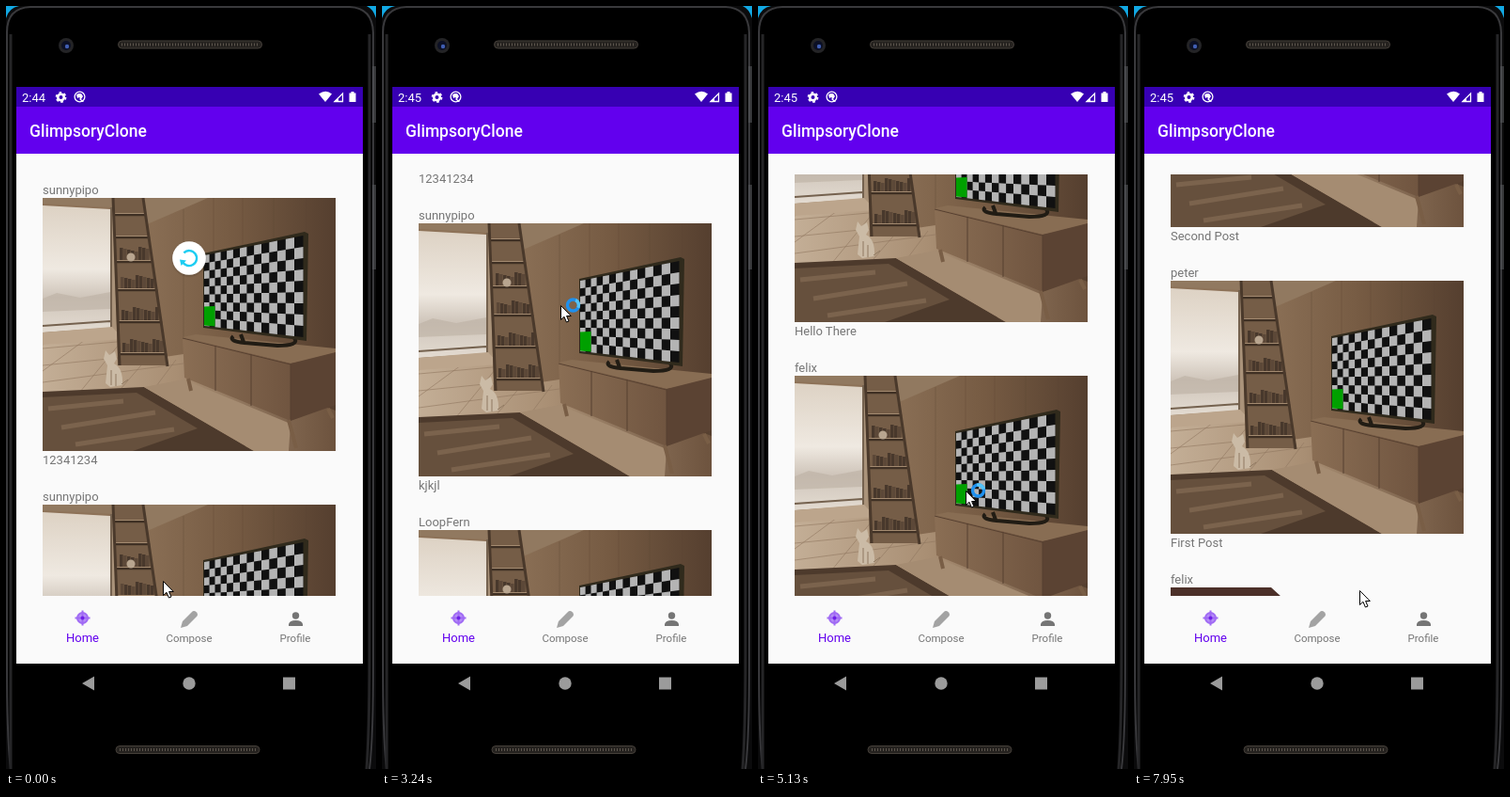
Animation, 394 px wide and 811 px high, one loop 8000 ms. Source, as an HTML page:

```html
<!DOCTYPE html>
<html lang="en">
<head>
<meta charset="utf-8">
<title>Photo feed</title>
<style>
html, body { margin: 0; width: 100%; height: 100%; overflow: hidden; background: #000; }
svg { display: block; font-family: Roboto, sans-serif; }
.post text { font-size: 13px; fill: #757575; }
</style>
</head>
<body>
<svg width="394" height="811" viewBox="0 0 394 811">
<defs>
  <clipPath id="listClip"><rect x="39" y="179" width="313" height="448"/></clipPath>
  <clipPath id="photoClip"><rect width="312" height="269"/></clipPath>
  <linearGradient id="wall"><stop offset=".3" stop-color="#8d7258"/><stop offset=".65" stop-color="#765b43"/><stop offset="1" stop-color="#553f2f"/></linearGradient>
  <linearGradient id="sky" x2="0" y2="1"><stop stop-color="#ddd2c4"/><stop offset=".5" stop-color="#efe9e1"/><stop offset=".72" stop-color="#cfc5ba"/><stop offset="1" stop-color="#e3dbd1"/></linearGradient>
  <linearGradient id="floor"><stop stop-color="#c3ae96"/><stop offset=".45" stop-color="#a98f74"/><stop offset="1" stop-color="#6d533e"/></linearGradient>
  <linearGradient id="front"><stop stop-color="#8a6e54"/><stop offset="1" stop-color="#705540"/></linearGradient>
  <filter id="shade" x="-30%" y="-30%" width="160%" height="170%"><feDropShadow dx="0" dy="1" stdDeviation="1.2" flood-opacity=".25"/></filter>
  <g id="room" clip-path="url(#photoClip)">
    <path fill="url(#wall)" d="M0 0h312v269H0z"/>
    <path fill="#917960" d="M0 0H176L109 29 74 10 0 6z"/>
    <path fill="#aa937a" d="M74 10 109 29V178H74z"/>
    <path stroke="#5d4735" stroke-opacity=".35" d="M150 12V150M182 0V60M213 0V52M246 0V45M281 0V40M302 0V160"/>
    <path fill="url(#floor)" d="M0 144 74 138 110 172 150 166 312 226V269H0z"/>
    <path stroke="#8f775f" stroke-opacity=".6" fill="none" d="M0 160 90 152M0 178 120 166M0 196 150 176M20 144 0 156M60 140 0 184M86 150 40 206M110 172 84 202M142 172 118 204"/>
    <path fill="url(#sky)" d="M0 8 72 12V138L0 143z"/>
    <path fill="#bdb1a4" opacity=".6" d="M0 107 15 101 40 106 72 100V118L0 121z"/>
    <path fill="none" stroke="#75624f" stroke-width="2" d="M0 136 72 131M73 10V138"/>
    <path fill="#bca58c" d="M0 143 74 137 86 150 0 156z"/>
    <g id="shelf"></g>
    <path fill="#4d3a2c" d="M0 206 108 201 225 269H0z"/>
    <path fill="#66503d" d="M0 212 100 207 165 245 96 269H0z"/>
    <path stroke="#876e56" stroke-width="5" opacity=".65" d="M6 224 86 216M20 244 120 228M35 262 140 246"/>
    <path fill="#a58c72" d="M108 201 150 193 264 240 262 269H225z"/>
    <path fill="#886d53" d="M149 148 163 145 312 160V168L264 176z"/>
    <path fill="url(#front)" d="M149 148 264 176V237L151 191z"/>
    <path fill="#5b4333" d="M264 176 312 164V220L264 237z"/>
    <path stroke="#574030" fill="none" d="M149 149 264 177M184 157V205M222 166V221M264 176V237"/>
    <path stroke="#795e46" stroke-width="4" fill="none" d="M155 192 158 205M262 236 270 266M304 224 309 234"/>
    <path stroke="#211c14" stroke-width="4" fill="none" d="M203 147Q197 152 215 154L250 157Q274 157 268 149M211 145 214 153"/>
    <path fill="#302a1c" d="M171 59 279 36 283 38 281 152 171 138z"/>
    <path fill="#111" d="M172 61 277.5 40V148L172 136z"/>
    <path id="checks" fill="#b4b4b4"/>
    <path fill="#00a000" d="M172 115.5 183.5 115V136.5L172 135.5z"/>
    <path fill="#cbbba6" d="M67 162 71 167 77 163 79 171 76 176Q86 181 85 199L72 201 67 197 69 178 65 171z"/>
    <path stroke="#8e7861" fill="none" d="M73 183V199M78 187V200M84 198 91 193"/>
  </g>
  <g id="other"><path fill="#4c3029" d="M0 0H107L118 10V269H0z"/></g>
</defs>

<path fill="#0b0b0c" d="M0 0H394V811H0z"/>
<path fill="#12a9e4" d="M0 0H14Q3 2 0 13zM384 0H394V13Q391 3 384 0z"/>
<path fill="#000" stroke="#39393c" stroke-width="2" d="M5 811Q1 780 1 700V28Q1 2 26 1H366Q390 2 391 28V700Q391 780 387 811"/>
<path fill="none" stroke="#252527" stroke-width="3" d="M387 30V690Q387 770 384 811M5 30V811"/>
<path fill="#55565a" d="M390 64h4v60h-4zM390 190h4v90h-4z" opacity=".6"/>
<circle cx="64" cy="42" r="8" fill="#242426"/><circle cx="64" cy="42" r="5" fill="#0c1025"/><circle cx="65" cy="43" r="2.2" fill="#405eb2"/>
<g fill="#25221f" stroke="#45403a"><rect x="119.500" y="37" width="153" height="8" rx="4"/><rect x="117" y="786.500" width="153" height="8" rx="4"/></g>
<g stroke="#5c554d" stroke-width="3" stroke-dasharray="1 2"><path d="M123 41H269M121 790.500H267"/></g>

<path fill="#fafafa" d="M11 86H380V699H11z"/>
<path fill="#3700b3" d="M11 86H380V107H11z"/>
<path fill="#6200ee" d="M11 107H380V157H11z"/>
<g fill="#fff">
  <text id="clock" x="17" y="101.500" font-size="13">2:44</text>
  <text x="25" y="139" font-size="17.500" font-weight="500">GlimpsoryClone</text>
  <circle cx="58.500" cy="97" r="3.300" fill="none" stroke="#fff" stroke-width="2.600"/>
  <circle cx="58.500" cy="97" r="5" fill="none" stroke="#fff" stroke-width="1.800" stroke-dasharray="2.600 2.636"/>
  <circle cx="78.500" cy="96.500" r="5.400" fill="none" stroke="#fff" stroke-width="1.300"/>
  <path d="M75 94.500 77 93H80L82 96 80 99 78 97 76 98zM79 98 83 102 81.500 102 78 99z"/>
  <path d="M333 93.500Q340.500 88 347 93.500L340 102z"/>
  <path d="M358.500 93V101.500H350z" fill="none" stroke="#fff" stroke-width="1.300"/><path d="M349 102 354 97V102z"/>
  <path d="M365.500 92.500H367.500V91H370.500V92.500H372.500V102H365.500z"/>
</g>

<g clip-path="url(#listClip)"><g id="list"></g></g>

<g id="spinner">
  <circle r="17.800" fill="#fff" filter="url(#shade)"/>
  <g id="arc" fill="none" stroke="#1dcdf2" stroke-width="2.400">
    <path id="arcLine" d="M-7.400 3A8 8 0 1 0 -5.600 -5.600"/>
    <path id="arrow" d="M-10 1.500 -3 2.500 -8.500 8z" fill="#1dcdf2" stroke="none"/>
  </g>
</g>

<g text-anchor="middle" fill="#757575" font-size="11.500">
  <g stroke="#a06af4" fill="none" stroke-width="2"><circle cx="81.500" cy="650.500" r="5.500" fill="#b58df6"/><path d="M73.500 650.500H89.500M81.500 642.500V658.500"/></g>
  <circle cx="81.500" cy="650.500" r="2" fill="#6f20e8"/>
  <path fill="#a3a3a3" d="M186 661 188 654 198 644Q200 642 203 644.500 205 647 203 649L193 659z"/>
  <circle cx="308.500" cy="648" r="3.700"/><path d="M301 659V657Q302 653 308.500 653T316 657V659z"/>
  <text x="81.500" y="675.500" font-size="13" fill="#6200ee">Home</text>
  <text x="195" y="675.500">Compose</text>
  <text x="308" y="675.500">Profile</text>
</g>
<g fill="#9b9b9b"><path d="M81 720 94 712.500V727.500zM295 713.500H308V726.500H295z"/><circle cx="195" cy="720" r="6.700"/></g>

<g id="cursor">
  <path d="M.5 .5V15.500L4 12.300 6.400 18 9 17 6.600 11.500H11.300z" fill="#fff" stroke="#000"/>
  <g id="busy" transform="translate(13.500 0)" fill="none" stroke-width="3.400">
    <circle r="6" stroke="#1e90ee"/><path id="glint" d="M0 -6A6 6 0 0 1 6 0" stroke="#54c4f8"/>
  </g>
</g>
</svg>

<script>
const el = id => document.getElementById(id);
const LOOP = 8000, PITCH = 326;

const posts = [
  ['sunnypipo', '12341234'], ['sunnypipo', 'kjkjl'], ['LoopFern', 'LoopFern Test Post'],
  ['Hello', 'Hello There'], ['felix', 'Second Post'], ['peter', 'First Post'], ['felix', '']
];
el('list').innerHTML = posts.map(([user, caption], i) => `
  <g class="post" transform="translate(39 ${204 + i * PITCH})">
    <text y="-4">${user}</text><use href="#${i < 6 ? 'room' : 'other'}"/><text y="282.500">${caption}</text>
  </g>`).join('');

// Checkerboard on the slanted screen
const screenPoint = (u, v) => {
  const k = .72 * u + .28 * u * u, top = 61 - 21 * k, bottom = 136 + 12 * k;
  return `${(172 + 105.5 * k).toFixed(1)} ${(top + (bottom - top) * v).toFixed(1)}`;
};
const COLS = 14, ROWS = 9;
let checks = '';
for (let c = 0; c < COLS; c++) for (let r = c % 2; r < ROWS; r += 2) {
  const corner = (dc, dr) => screenPoint((c + dc) / COLS, (r + dr) / ROWS);
  checks += `M${corner(0, 0)}L${corner(1, 0)} ${corner(1, 1)} ${corner(0, 1)}z`;
}
el('checks').setAttribute('d', checks);

// Ladder shelf with books
const boards = [18, 42, 68, 98, 132, 166];
let shelf = '<path fill="#755d47" d="M75 0H106L134 178H80z"/>';
boards.forEach((y, i) => {
  const left = 76 + y * .03, right = 108 + y * .145;
  if (i > 1) for (let x = left + 4, n = i; x < right - 5; x += 4, n++) {
    const h = 11 + n * 5 % 6;
    shelf += `<rect x="${x}" y="${y - h}" width="3.500" height="${h}" fill="${n % 3 ? '#48382c' : '#5c4838'}"/>`;
  }
  shelf += `<path stroke="#3f3024" stroke-width="2.500" d="M${left} ${y}H${right}"/>
    <path stroke="#a38a70" d="M${left} ${y - 1.5}H${right}"/>`;
});
shelf += '<circle cx="94" cy="63" r="4.500" fill="#b8a58f"/>' +
  '<path fill="none" stroke="#4a392b" stroke-width="3" d="M75 0 82 178M107 0 133 179"/>';
el('shelf').innerHTML = shelf;

const run = (from, to, step = 120) =>
  Array.from({ length: (to - from) / step + 1 }, (_, i) => from + i * step);
const ticks = [0, 130, 290, 410, 550, 700, ...run(1540, 2380), 2540, 2700, 2850, ...run(3000, 3360),
  ...run(3520, 3640), ...run(3790, 4150), 4300, ...run(4450, 4690), 4840, 4970, 5130, 5270,
  ...run(5420, 6020), 6170, 6290, 6420, 6570, 6720, 6850, ...run(6990, 7950)];

// Keys are [time, value...]
const scrollKeys = [[2850, 0], [3000, 70], [3240, 299], [3360, 375], [3640, 430], [4030, 715],
  [4150, 775], [4450, 825], [4840, 1040], [5130, 1115], [5420, 1190], [6020, 1407], [6570, 1500],
  [6850, 1500], [7950, 1542]];
const cursorKeys = [[0, 167, 611], [130, 180, 622], [410, 203, 633], [1420, 203, 633], [1660, 200, 500],
  [2020, 204, 615], [2140, 204, 621], [2380, 204, 621], [2540, 195, 615], [2700, 183, 609], [2850, 179, 595],
  [3240, 190, 318], [3360, 192, 290], [3640, 184, 570], [4030, 178, 275], [4150, 180, 265], [4450, 205, 560],
  [4840, 215, 330], [5130, 221, 515], [5270, 222, 545], [5720, 232, 320], [6020, 243, 492],
  [6290, 262, 400], [6570, 312, 586], [6720, 311, 640], [6850, 312, 668], [7350, 250, 520], [7950, 240, 621]];
const spinKeys = [[0, 268], [130, 268], [410, 216], [1540, 160], [1900, 235], [2140, 216]];

function sample(keys, t) {
  const i = keys.findIndex(k => k[0] > t);
  if (i < 0) return keys[keys.length - 1].slice(1);
  if (i === 0) return keys[0].slice(1);
  const a = keys[i - 1], b = keys[i], p = (t - a[0]) / (b[0] - a[0]);
  return a.slice(1).map((v, n) => v + (b[n + 1] - v) * p);
}
const show = (id, on) => el(id).setAttribute('display', on ? 'inline' : 'none');
const move = (id, value) => el(id).setAttribute('transform', value);

function draw(time) {
  const now = time % LOOP;
  const t = ticks.filter(tick => tick <= now).pop();
  const [x, y] = sample(cursorKeys, t);
  const pulling = t < 290 || t >= 1540 && t < 2020;
  const spinScale = t === 550 ? .5 : 1;

  move('list', `translate(0 ${-sample(scrollKeys, t)[0]})`);
  move('cursor', `translate(${x} ${y})`);
  move('glint', `rotate(${t * .36 - 60})`);
  show('busy', t >= 1540 && t < 6990);
  show('spinner', t < 700 || t >= 1660 && t < 2540);
  move('spinner', `translate(195 ${sample(spinKeys, t)[0]}) scale(${spinScale})`);
  show('arrow', pulling);
  move('arc', `rotate(${t < 700 ? t * .4 : (t - 2140) * .4})`);
  el('clock').textContent = t < 3000 ? '2:44' : '2:45';
}
const start = performance.now();
(function frame() {
  draw(performance.now() - start);
  requestAnimationFrame(frame);
})();
</script>
</body>
</html>
```
